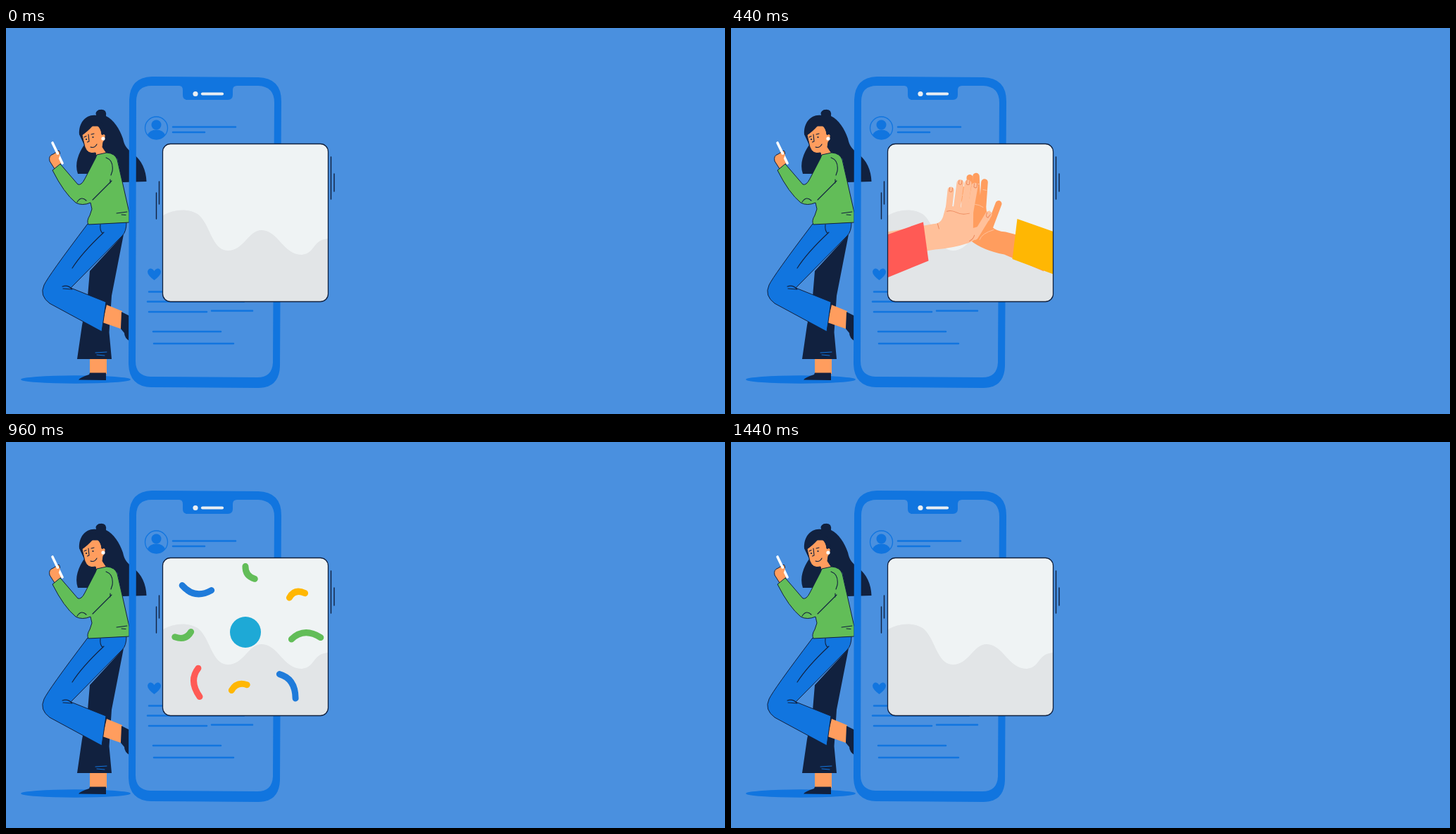
An HTML page for the animation above (1680 ms loop, 1021 by 548 pixels).

```html
<!DOCTYPE html>
<html lang="en">
<head>
<meta charset="utf-8">
<title>High five</title>
<style>
html, body { margin: 0; width: 100%; height: 100%; overflow: hidden; background: #4a90df; }
svg { display: block; width: 100%; height: 100%; }
.blue { fill: #1175df; }
.navy { fill: #11213f; }
.skin { fill: #ff9d5e; }
.line { fill: none; stroke: #11213f; stroke-width: 1.1; }
.line, .ui, .hand path { stroke-linecap: round; stroke-linejoin: round; }
.edge { stroke: #11213f; stroke-width: 1; stroke-linejoin: round; }
.ui { fill: none; stroke: #1175df; stroke-width: 2.6; }
.hand path { fill: none; }
.hand .palm { stroke: none; }
</style>
</head>
<body>
<svg viewBox="0 0 1021 548" preserveAspectRatio="none">
  <defs><clipPath id="card"><rect x="223" y="165" width="234" height="223" rx="10.5"/></clipPath></defs>
  <rect width="1021" height="548" fill="#4a90df"/>
  <ellipse class="blue" cx="99" cy="499" rx="78" ry="5.8"/>

  <g id="woman">
    <path class="navy" d="M104 151C103 134 114 122 128 124C126 117 136 113 141 118Q143 121 142 125C153 130 161 143 166 157C168 167 172 172 180 178C193 188 199 202 199.5 218L165 219L158 185L124 203L122 207H102C97 192 103 178 111 166Z"/>
    <path class="line" d="M128 121Q130 116 135 117"/>
    <path class="skin edge" d="M108 152L121 139L133 139Q136 147 136 151Q142 149 141 155Q140 160 138 162L137 169L143 178Q136 184 128 181L127 177Q116 180 112 169Z"/>
    <path class="navy" d="M104 151Q106 130 121 129Q140 130 142 150L136 152Q135 143 129 138Q126 140 124 138Q115 148 107 153Z"/>
    <circle cx="138" cy="157" r="2.6" fill="#fff"/>
    <path class="line" d="M117 151L118 161L115.5 162M120 169Q126 171 129 165M111 155L114 153.500M121 151L125 150"/>
    <circle class="navy" cx="114" cy="158" r="1.1"/><circle class="navy" cx="123.500" cy="155" r="1.1"/>

    <path class="navy" d="M167 293L119 345L116 381L108 422L101 470H150L146.500 432L150 380Z"/>
    <path class="skin" d="M119 470H143V491H119ZM143 393L165 402L163 427L137 418Z"/>
    <path class="navy" d="M103 499.500Q105 496 118 492L119 489.500H142V500ZM164 403L176 409V445Q168 440 168 433L163 427Z"/>
    <path class="ui" style="stroke-width:1" d="M127 461L143 460M129 464L140 465"/>
    <path class="blue edge" d="M116 278L171 276Q171 289 165 295L92 369L142 389L136 431L62 391Q47 380 54 365Q60 352 116 278Z"/>
    <path class="line" d="M94 341Q108 319 139 290M80 367Q88 364 94 371L81 370M134 279Q133 288 137 291"/>

    <path class="skin edge" d="M69 200L62 189Q60 181 67 179L75 174Q78 177 75 183L79 190L77 195Z"/>
    <path d="M66 163L80 192" fill="none" stroke="#fff" stroke-width="3.600" stroke-linecap="round"/>
    <path class="skin" d="M64 186L72 180L77 179L75 185L70 190Z"/>
    <path class="edge" fill="#62bd58" d="M77 193L102 222Q107 224 112 214L127 185L129 180L143 177Q155 178 158 187L166 222L175 262V276L117 279Q114 274 119 266L122 257L120 248Q108 253 99 248Q82 234 66 202Z"/>
    <path class="line" d="M101 247Q107 238 114 245M123 244L150 217M148 220L148 215M142 184Q153 188 151 203L149 209M157 263L172 261M164 265L170 265.500"/>
  </g>

  <g id="phone">
    <path class="blue" fill-rule="evenodd" d="M207 69L358 70Q391 71 391 104L389 480Q388 511 358 511L206 510Q175 509 174 477L175 102Q176 70 207 69ZM207 82H246Q251 82 251 88V95Q251 102 258 102H315Q322 102 322 95V88Q322 82 328 82H358Q381 83 381 106L379 475Q378 496 357 496L205 495Q184 494 184 473L185 104Q185 82 207 82Z"/>
    <circle cx="269" cy="93.500" r="3.600" fill="#e9eef2"/>
    <path d="M279 93.500H307" stroke="#e9eef2" stroke-width="4.200" stroke-linecap="round"/>
    <circle class="ui" style="stroke-width:1.300" cx="213.500" cy="142" r="16"/>
    <circle class="blue" cx="213.500" cy="137.500" r="7"/>
    <path class="blue" d="M201 152Q204 144.500 213.500 144.500T226 152Q221 158 213.500 158T201 152Z"/>
    <path class="ui" d="M237 140.500H326M237 148H282M203 374.500H230M201 388.500H338M203 403H285M292 401.500H350M209 431H305M210 448H323"/>
    <path class="blue" d="M210.500 358Q201 351 201 346Q202 341 206 341.500Q209 342 210.500 345Q212 342 215 341.500Q219 341 220 346Q220 351 210.500 358Z"/>
  </g>

  <path class="line" style="stroke-width:1.400" d="M217.500 218V250M213.500 234V271M461.500 183V243M466 207V232"/>
  <rect x="222.500" y="164.500" width="235" height="224" rx="11" fill="#eff3f4"/>
  <g clip-path="url(#card)">
    <path fill="#e2e5e7" d="M222 267C235 258 258 255 272 264C290 277 292 316 315 316C338 316 344 287 363 287C386 287 394 322 420 322C440 320 434 301 458 299V389H222Z"/>
    <circle id="badge" r="22" fill="#1ea9d6"/>
    <g id="confetti" fill="none" stroke-width="9" stroke-linecap="round"></g>

    <g id="rightArm">
      <g class="hand" id="rightHand" stroke="#ff9d5e">
        <path stroke-width="9" d="M365.500 232L370 264M375 215L379 262M416 252L404 284"/>
        <path stroke-width="9.600" d="M384 213L386 262M396 221.500L393 264"/>
        <path class="palm" style="fill:#ff9d5e" d="M364.500 256L398 256L400 270L403 277L411 276L406 284Q412 291 426 292L480 306V348L424 324Q393 318 376 304Q364 294 365 278Z"/>
        <path stroke="#ffc09a" stroke-width="1" d="M372 256Q382 249 394 257M389 303Q392 294 409 289M364 240L369 239M375 226L380 225M384 224L389 224M394 232L399 233M403 262L401 270"/>
      </g>
      <path id="rightSleeve" fill="#ffb703" d="M428 274L531 310L521 368L421 331Z"/>
    </g>

    <g id="leftArm">
      <g class="hand" id="leftHand" stroke="#ffc09a">
        <path stroke-width="9.200" d="M268 240.500L268.500 275M301 230.500L298.500 275M325.500 268L310 302"/>
        <path stroke-width="10" d="M280 229L279.500 275M291 228L290 275"/>
        <path class="palm" style="fill:#ffc09a" d="M264 263H303L306 290L313 287L320 290Q314 306 302 312Q281 322 256 327L180 349V312L250 291Q261 289 262 276Z"/>
        <path stroke="#ed8b5f" stroke-width="1" d="M266 271Q272 268 280 271T298 270M255 290L258 297M303 309Q308 306 309 300M266 237V242Q268 244 270 242V237M278 225V230Q280 232 282 230V225M289 224V229Q291 231 293 229V224M300 227V232Q302 234 304 232V227M323 266Q321 272 325 273L328 268"/>
      </g>
      <path id="leftSleeve" fill="#ff5a55" d="M249.500 280L149 315L157 376L257 335Z"/>
    </g>
  </g>
  <rect x="222.500" y="164.500" width="235" height="224" rx="11" fill="none" stroke="#11213f" stroke-width="1.300"/>
</svg>
<script>
const LOOP = 1680, STEP = 40, CLAP = 440, REST = 44 / 131;
const GREEN = '#62bd58', BLUE = '#1f7bda', YELLOW = '#ffb703', RED = '#ff5a55';
const el = id => document.getElementById(id);
const clamp = x => Math.max(0, Math.min(1, x));
const easeOut = x => 1 - (1 - clamp(x)) ** 2;
const place = (id, value) => el(id).setAttribute('transform', value);

// start point, control point, end point, colour, pop time
const ribbons = [
  [249.5, 205.5, 269, 224, 291.5, 208.5, BLUE, 670],
  [339, 177, 340, 191, 354, 193.5, GREEN, 670],
  [403, 222, 409, 208, 424.5, 213.5, YELLOW, 670],
  [406, 282, 422, 263, 447, 275.5, GREEN, 670],
  [240, 278, 256, 282, 262, 268.5, GREEN, 740],
  [271, 321, 259, 340, 277, 361, RED, 740],
  [321, 353.5, 327, 340, 342, 343.5, YELLOW, 740],
  [387, 331, 410, 335, 413, 363, BLUE, 740]
].map(([x1, y1, cx, cy, x2, y2, color, start]) => {
  const x = (x1 + x2) * 0.375 + cx / 4, y = (y1 + y2) * 0.375 + cy / 4;
  const path = document.createElementNS('http://www.w3.org/2000/svg', 'path');
  path.setAttribute('d', `M${x1 - x} ${y1 - y}Q${cx - x} ${cy - y} ${x2 - x} ${y2 - y}`);
  path.setAttribute('stroke', color);
  el('confetti').append(path);
  return { path, x, y, start };
});

// distance between the hands: 0 while touching, REST when side by side, 1 at the card's edge
const gap = t => t <= CLAP
  ? ((CLAP - t) / 240) ** 1.27
  : REST * ((t - CLAP) / 160) ** 1.267;

function drawHands(t) {
  const g = gap(t);
  const touch = clamp(1 - g / REST);
  const away = Math.max(0, (g - REST) / (1 - REST));
  place('leftArm', `translate(${-87 * away} ${24 * away})`);
  place('leftHand', `translate(${38 * touch} ${-8 * touch}) rotate(${7 * touch} 290 290)`);
  place('leftSleeve', `translate(${23.5 * touch} ${-4.5 * touch})`);
  place('rightArm', `translate(${79 * away} ${10 * away})`);
  place('rightHand', `translate(${-36 * touch} ${-2.5 * touch})`);
  place('rightSleeve', `translate(${-21.5 * touch} ${-3 * touch})`);
}

function draw(time) {
  const t = Math.floor((time % LOOP) / STEP) * STEP;
  const leave = 1 - clamp((t - 1280) / 160) ** 2;
  drawHands(t);
  place('badge', `translate(340 270) scale(${easeOut((t - 520) / 200) * leave})`);
  const turn = (1160 - t) / 36;
  for (const { path, x, y, start } of ribbons) {
    const size = easeOut((t - start) / 130) * leave;
    path.setAttribute('visibility', size > 0 ? 'visible' : 'hidden');
    path.setAttribute('transform', `translate(${x} ${y}) rotate(${turn}) scale(${size})`);
  }
}

const began = performance.now();
function tick() {
  draw(performance.now() - began);
  requestAnimationFrame(tick);
}
tick();
</script>
</body>
</html>
```
